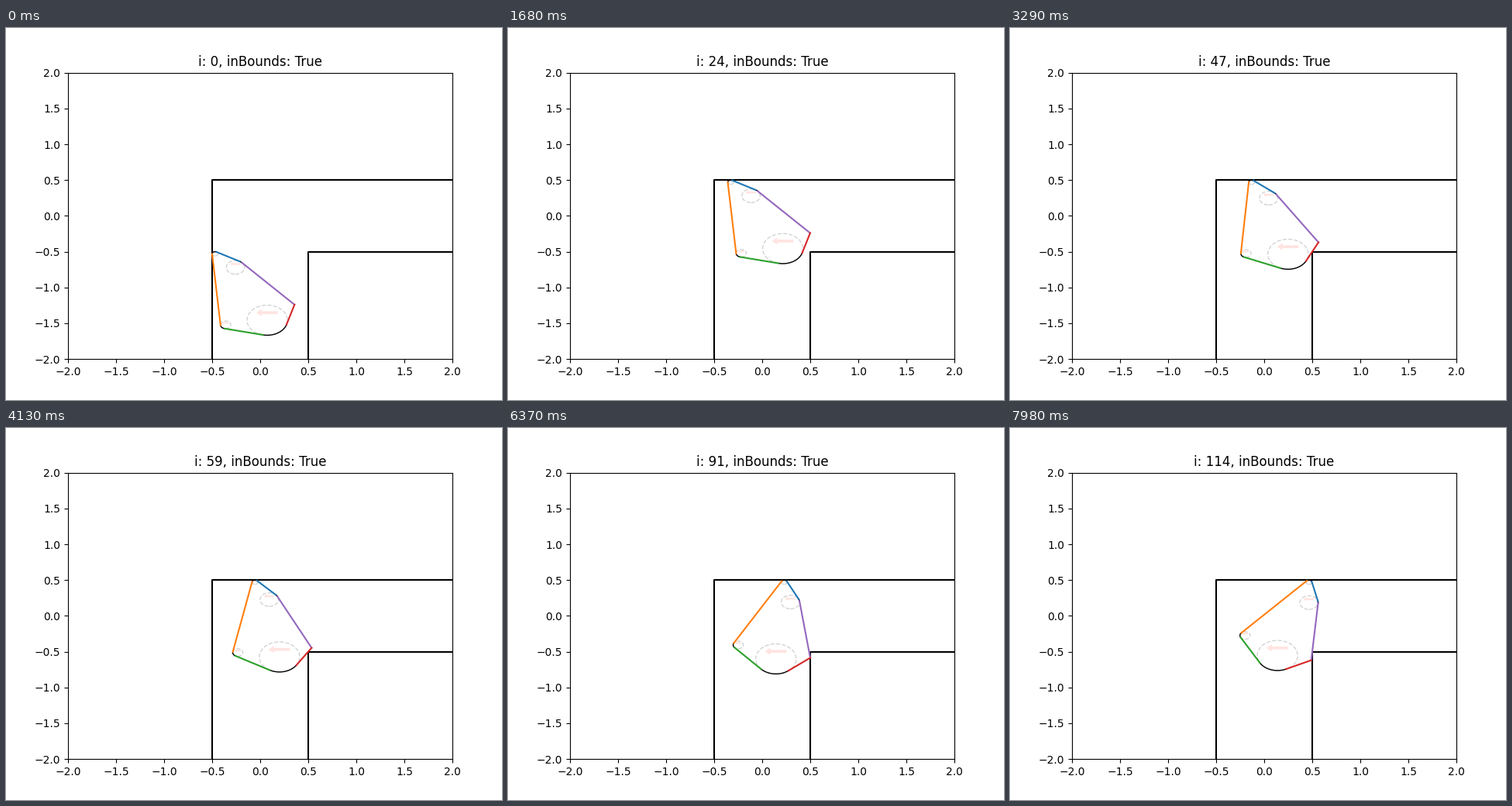
Animation of 640 by 480 pixels, one loop 8000 ms. Source, as a matplotlib script:

```python
import numpy as np
import matplotlib.pyplot as plt
from matplotlib.animation import FuncAnimation
from matplotlib.patches import Circle, Polygon

LOOP, INTERVAL, STEP = 8000, 40, 70
SLIDE = 15           # steps for each of the two straight moves
TURN = 0.01          # radians per step once the body pivots

# Corner circles in clockwise order: x, y, radius
CORNERS = np.array([
    (-0.470, -0.530, 0.030),
    (-0.258, -0.720, 0.095),
    (0.357, -1.240, 0.000),
    (0.073, -1.457, 0.210),
    (-0.360, -1.522, 0.053),
])
CENTERS, RADII = CORNERS[:, :2], CORNERS[:, 2]
COLORS = ["tab:blue", "tab:purple", "tab:red", "tab:green", "tab:orange"]
N = len(CORNERS)

# Block arrow pointing left, one unit long
ARROW = np.array([(0.5, 0.1), (0.5, -0.1), (-0.3, -0.1), (-0.3, -0.3),
                  (-0.5, 0.0), (-0.3, 0.3), (-0.3, 0.1)]) * (1, 0.6)


def unit(angle):
    return np.column_stack([np.cos(angle), np.sin(angle)])


def normal_angles():
    """Outward normal of the tangent from each corner to the next."""
    d = np.roll(CENTERS, -1, axis=0) - CENTERS
    drop = RADII - np.roll(RADII, -1)
    return np.arctan2(d[:, 1], d[:, 0]) + np.arccos(drop / np.hypot(*d.T))


NORMALS = normal_angles()


def arc(centers, k, turn):
    start, end = NORMALS[k - 1], NORMALS[k]
    sweep = (start - end) % (2 * np.pi)
    angles = start - turn - np.linspace(0, sweep, 30)
    return centers[k] + RADII[k] * unit(angles)


def reach(arcs):
    """Largest x of the outline at or below the inner corner's height."""
    p = np.vstack(arcs)
    q = np.roll(p, -1, axis=0)
    a, b = p[:, 1] + 0.5, q[:, 1] + 0.5
    cross = a * b < 0
    t = a[cross] / (a[cross] - b[cross])
    hits = p[cross, 0] + t * (q[cross, 0] - p[cross, 0])
    return max(np.concatenate([p[a <= 0, 0], hits]))


def pose(turn):
    """Turned centers, pressed against the top wall and the inner corner."""
    c, s = np.cos(turn), np.sin(turn)
    centers = CENTERS @ np.array([(c, -s), (s, c)])
    centers[:, 1] += 0.5 - max(centers[:, 1] + RADII)
    arcs = [arc(centers, k, turn) for k in range(N)]
    centers[:, 0] += 0.5 - reach(arcs)
    return centers


SHIFT = (pose(0) - CENTERS)[0]


def place(i):
    if i < 2 * SLIDE:
        up = min(i / (SLIDE - 1), 1)
        right = max(i - SLIDE, 0) / (SLIDE - 1)
        return CENTERS + SHIFT * (right, up), 0
    turn = TURN * (i - 2 * SLIDE)
    return pose(turn), turn


fig, ax = plt.subplots(figsize=(6.4, 4.8), dpi=100)
ax.set_xlim(-2, 2)
ax.set_ylim(-2, 2)
ax.plot([-0.5, -0.5, 2], [-2, 0.5, 0.5], "k")
ax.plot([0.5, 0.5, 2], [-2, -0.5, -0.5], "k")
title = ax.set_title("")

rings, arrows, bends, sides = [], [], [], []
for r, color in zip(RADII, COLORS):
    rings.append(ax.add_patch(Circle((0, 0), r, fill=False, lw=1, ls="--",
                                     ec="lightgray", visible=r > 0)))
    arrows.append(ax.add_patch(Polygon(ARROW, color="mistyrose", lw=1,
                                       visible=r > 0)))
    bends += ax.plot([], [], "k", lw=1, zorder=1, visible=r > 0)
    sides += ax.plot([], [], color=color)


def update(frame):
    i = (frame * INTERVAL + 30) // STEP
    centers, turn = place(i)
    arcs = [arc(centers, k, turn) for k in range(N)]
    for k in range(N):
        r = RADII[k]
        rings[k].center = centers[k]
        arrows[k].set_xy(centers[k] + (0, r / 2) + ARROW * r)
        bends[k].set_data(*arcs[k].T)
        sides[k].set_data(*np.array([arcs[k][-1], arcs[(k + 1) % N][0]]).T)
    title.set_text(f"i: {i}, inBounds: True")
    return [title, *rings, *arrows, *bends, *sides]


anim = FuncAnimation(fig, update, frames=LOOP // INTERVAL, interval=INTERVAL,
                     repeat=True, repeat_delay=0, blit=False)
plt.show()
```
